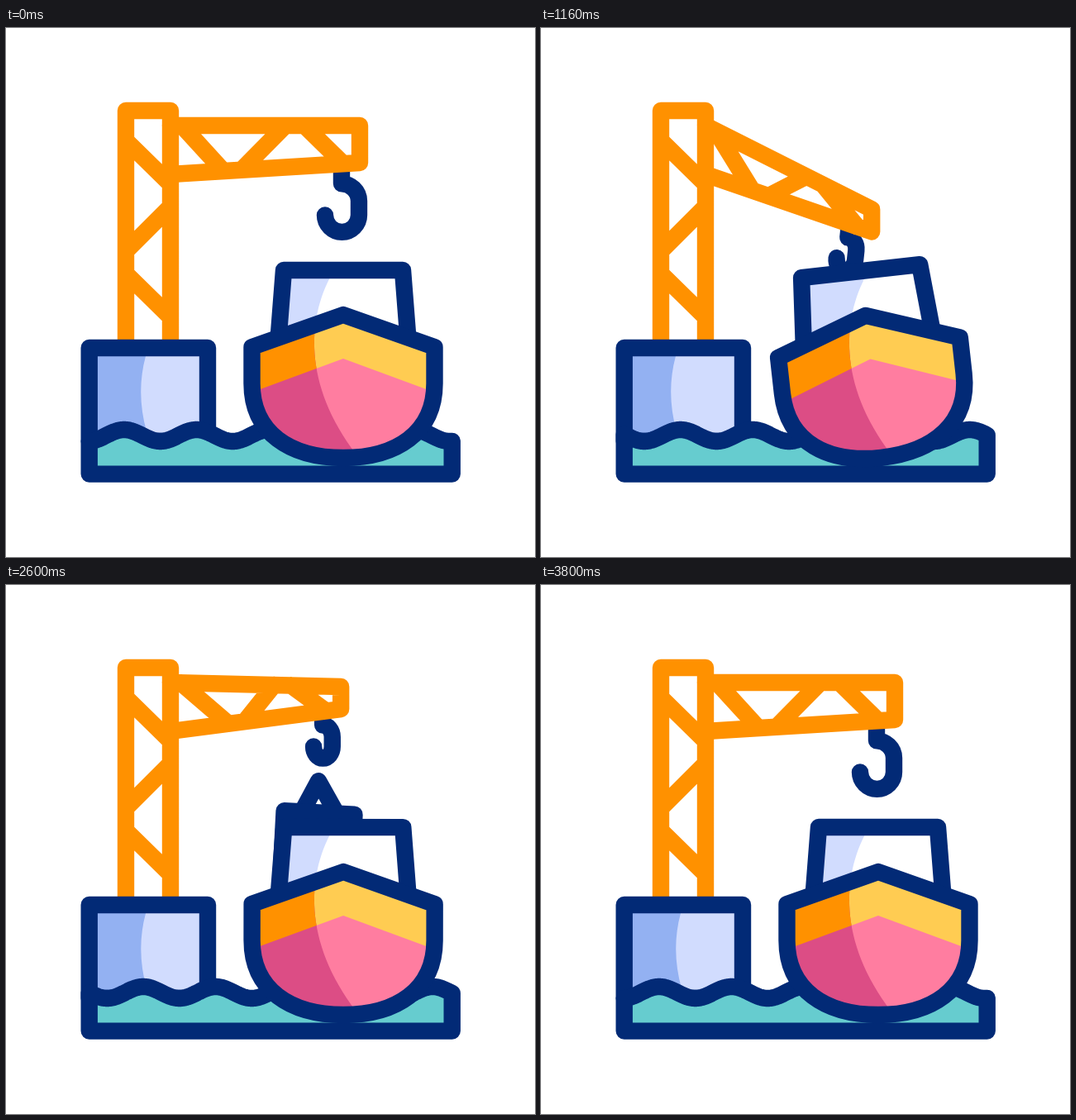
An HTML page with a canvas for the animation above (3840 ms loop, 640 by 640 pixels).

```html
<!DOCTYPE html>
<html lang="en">
<head>
<meta charset="utf-8">
<title>Harbour crane</title>
<style>
  html, body { margin: 0; width: 100%; height: 100%; overflow: hidden; background: #fff; }
  canvas { display: block; }
</style>
</head>
<body>
<canvas id="stage" width="640" height="640"></canvas>
<script>
const ctx = document.getElementById('stage').getContext('2d');
const { PI, sin, cos, min, max } = Math;
const LOOP = 3840, DOWN = 1720, UP = 2280, ROCK = 568;
const NAVY = '#022a76', ORANGE = '#ff9100', YELLOW = '#ffcc52', PINK = '#ff7da0',
      ROSE = '#dc4d85', BLUE = '#93b1f2', PALE = '#d1dcfe', SEA = '#66cccf', WHITE = '#fff';

const hull = new Path2D('M297.5 386L408 347L518.5 386V430C518.5 490 472 520 408 520C344 520 297.5 490 297.5 430Z');
const band = new Path2D('M297.5 386L408 347L518.5 386V440.7L408 400L297.5 440.7Z');
const cabin = new Path2D('M330 370L336 293H480L486 370');
const boatShade = new Path2D('M393 300C366 350 358 430 424 516V560H250V250H393Z');
const dock = new Path2D('M100.7 387H244V500H100.7Z');
const dockShade = new Path2D('M169 397Q157 441 170 488V510H80V397Z');
const tower = new Path2D('M145 387V100H199V387M145 136L199 189M199 216L145 270M145 297L199 350');
const cargoBox = new Path2D('M-42.5 0H42.5V78H-42.5Z');
const cargoRope = new Path2D('M-21 0L-3 -38L21 0');

const clamp = u => max(0, min(1, u));
const ramp = (t, from, to) => (1 - cos(PI * clamp((t - from) / (to - from)))) / 2;

function fill(path, color) { ctx.fillStyle = color; ctx.fill(path); }
function stroke(path, color) { ctx.strokeStyle = color; ctx.stroke(path); }
function scoped(draw) { ctx.save(); draw(); ctx.restore(); }
function turn(x, y, degrees) { ctx.translate(x, y); ctx.rotate(degrees * PI / 180); }

// Rocks between two tilts; the first and last swing start and end level.
function boatAngle(t) {
  if (t > 6 * ROCK) return 0;
  const outer = t < ROCK || t > 5 * ROCK;
  const [middle, reach] = outer ? [2, 2] : [-1.2, 5.2];
  return middle - reach * cos(PI * t / ROCK);
}

function drawCargo(t) {
  const lift = ramp(t, DOWN, UP) - ramp(t, UP, 3050);
  scoped(() => {
    turn(380 - 1.5 * lift, 350 - 118.5 * lift, 4.7 * lift);
    stroke(cargoRope, NAVY);
    fill(cargoBox, YELLOW);
    stroke(cargoBox, NAVY);
  });
}

function drawHook(x, y, scale, angle) {
  const kx = scale, ky = .3 + .7 * scale, hook = new Path2D();
  hook.moveTo(0, 0);
  hook.lineTo(0, 24 * ky);
  hook.bezierCurveTo(11 * kx, 24 * ky, 21 * kx, 33 * ky, 21 * kx, 45 * ky);
  hook.ellipse(.5 * kx, 62 * ky, 20.5 * kx, 20.5 * ky, 0, 0, PI);
  scoped(() => { turn(x, y, angle); stroke(hook, NAVY); });
}

function drawCrane(t) {
  const fold = ramp(t, 0, 760) - ramp(t, 2560, 3380);
  const descent = clamp(t / DOWN);
  const dip = sin(PI / 2 * descent) ** 1.6 - ramp(t, DOWN, UP);
  const sway = sin(PI * descent);
  const left = 199, tipX = 428 - 23 * fold - 6 * dip;
  const topY = 118 + 5 * fold + 120 * dip, bottomY = topY + 45 - 18 * fold;
  const at = (y0, y1) => f => [left + (tipX - left) * f, y0 + (y1 - y0) * f];
  const top = at(118, topY), bottom = at(177, bottomY);

  const hookX = tipX - 22 - 6 * sway;
  drawHook(hookX, bottom((hookX - left) / (tipX - left))[1], 1 - .45 * fold, 7 * sway);

  const jib = new Path2D(), slide = .06 * fold * (1 - dip) ** 2;
  const line = (...points) => points.forEach((p, i) => i ? jib.lineTo(...p) : jib.moveTo(...p));
  line(top(0), top(1), bottom(1), bottom(0));
  line(top(.06), bottom(.28 + slide));
  line(top(.607), bottom(.375 + slide));
  line(top(.707), bottom(.913));
  stroke(jib, ORANGE);
  stroke(tower, ORANGE);
}

function drawDock(shift) {
  fill(dock, PALE);
  scoped(() => {
    ctx.clip(dock);
    ctx.translate(shift, 0);
    fill(dockShade, BLUE);
  });
  stroke(dock, NAVY);
}

function drawWater(t) {
  const left = 100.7, right = 539.7, floor = 539.6, water = new Path2D();
  const crest = 143 - 46 * (1 - cos(PI * t / 1900));
  water.moveTo(left, floor);
  for (let x = left; x <= right; x++)
    water.lineTo(x, 493 - 7 * cos((x - crest) / 87.5 * 2 * PI));
  water.lineTo(right, floor);
  water.closePath();
  fill(water, SEA);
  stroke(water, NAVY);
}

// The shadow edge stays still while the boat rocks beneath it.
function drawBoat(angle) {
  const tilt = () => { turn(408, 486, angle); ctx.translate(-408, -486); };
  const paint = (cabinColor, hullColor, bandColor) => {
    tilt();
    fill(cabin, cabinColor);
    fill(hull, hullColor);
    fill(band, bandColor);
  };
  scoped(() => paint(WHITE, PINK, YELLOW));
  scoped(() => { ctx.clip(boatShade); paint(PALE, ROSE, ORANGE); });
  scoped(() => { tilt(); stroke(cabin, NAVY); stroke(hull, NAVY); });
}

function frame(now) {
  const t = now % LOOP, angle = boatAngle(t);
  ctx.fillStyle = WHITE;
  ctx.fillRect(0, 0, 640, 640);
  ctx.lineWidth = 20.4;
  ctx.lineCap = ctx.lineJoin = 'round';
  drawCargo(t);
  drawCrane(t);
  drawDock(angle * .95);
  drawWater(t);
  drawBoat(angle);
  requestAnimationFrame(frame);
}
requestAnimationFrame(frame);
</script>
</body>
</html>
```
